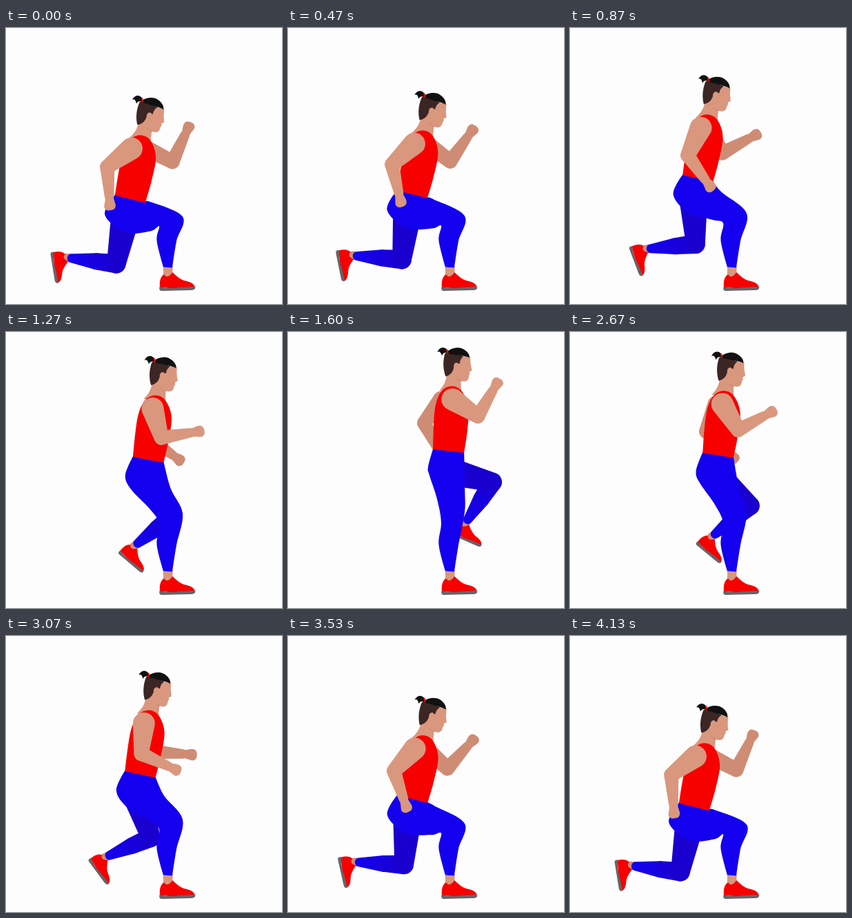
Animation of 400 by 400 pixels, one loop 4.2 s. Source, as an HTML page with a canvas:

```html
<!DOCTYPE html>
<html lang="en">
<head>
<meta charset="utf-8">
<title>Lunge to knee raise</title>
<style>
  html, body { margin: 0; width: 100%; height: 100%; overflow: hidden; background: #fefdfe; }
  canvas { display: block; width: 100vw; height: 100vh; }
</style>
</head>
<body>
<canvas id="stage"></canvas>
<script>
(() => {
  const LOOP = 4200;
  const FPS = 15;
  const RED = '#f60000', BLUE = '#1400ee', BLUE_FAR = '#1a00cf';
  const SKIN = '#d9977e', SKIN_FAR = '#cf8c75', BROWN = '#3b2624', BLACK = '#111111', SOLE = '#666468';

  // Each pose is met once rising and once sinking. Limb angles run from straight down, forward positive.
  const pose = (up, down, x, y, tilt, nearArm, farArm, leg) => ({ up, down, values: [x, y, tilt, ...nearArm, ...farArm, ...leg] });
  const poses = [
    pose(0, 4200, 180, 247, 9, [-53, 4], [63, 155], [-11, -97]),
    pose(630, 3530, 180.5, 235.5, 9, [-43, 19], [47, 138], [-4, -93]),
    pose(870, 3270, 185.5, 217, 8, [-25, 36], [30, 118], [3, -84]),
    pose(1270, 2850, 206.5, 184, 5.5, [17, 100], [-4, 54], [38, -52]),
    pose(1440, 2670, 214.5, 178, 4, [31, 118], [-19, 46], [48, -51]),
    pose(1720, 2370, 241.5, 169, 0, [68, 164], [-42, 19], [90, -22])
  ];
  const keys = [
    ...poses.map(p => ({ t: p.up, v: p.values })),
    ...poses.map(p => ({ t: p.down, v: p.values })).reverse()
  ];

  // Monotone cubic through the keys.
  function valueAt(t, k, n) {
    const rise = i => (keys[i + 1].v[n] - keys[i].v[n]) / (keys[i + 1].t - keys[i].t);
    const slope = i => {
      if (i === 0 || i === keys.length - 1) return 0;
      const a = rise(i - 1), b = rise(i);
      return a * b > 0 ? 2 * a * b / (a + b) : 0;
    };
    const span = keys[k + 1].t - keys[k].t;
    const u = (t - keys[k].t) / span, v = 1 - u;
    return v * v * (1 + 2 * u) * keys[k].v[n] + u * u * (3 - 2 * u) * keys[k + 1].v[n]
      + span * u * v * (v * slope(k) - u * slope(k + 1));
  }

  function poseAt(t) {
    let k = 0;
    while (k < keys.length - 2 && t >= keys[k + 1].t) k++;
    return keys[0].v.map((_, n) => valueAt(t, k, n));
  }

  const canvas = document.getElementById('stage');
  const ctx = canvas.getContext('2d');

  const rad = deg => deg * Math.PI / 180;
  const add = (p, x, y) => [p[0] + x, p[1] + y];
  const mix = (a, b, u) => [a[0] + (b[0] - a[0]) * u, a[1] + (b[1] - a[1]) * u];
  const reach = (p, len, deg) => add(p, len * Math.sin(rad(deg)), len * Math.cos(rad(deg)));
  const corner = p => [p[0], p[1], true];
  const turn = (x, y, deg) => {
    const c = Math.cos(rad(deg)), s = Math.sin(rad(deg));
    return [x * c - y * s, x * s + y * c];
  };

  // Closed smooth outline; points marked as corners stay sharp.
  function blob(pts, fill) {
    const n = pts.length;
    const tangent = i => {
      if (pts[i][2]) return [0, 0];
      const a = pts[(i + n - 1) % n], b = pts[(i + 1) % n];
      return [(b[0] - a[0]) / 6, (b[1] - a[1]) / 6];
    };
    ctx.beginPath();
    ctx.moveTo(pts[0][0], pts[0][1]);
    pts.forEach((p, i) => {
      const j = (i + 1) % n, q = pts[j], s = tangent(i), e = tangent(j);
      ctx.bezierCurveTo(p[0] + s[0], p[1] + s[1], q[0] - e[0], q[1] - e[1], q[0], q[1]);
    });
    ctx.fillStyle = fill;
    ctx.fill();
  }

  // Hull of two circles.
  function taper(a, ra, b, rb, fill) {
    const dir = Math.atan2(b[1] - a[1], b[0] - a[0]);
    const len = Math.hypot(b[0] - a[0], b[1] - a[1]);
    const off = Math.acos((ra - rb) / len);
    ctx.beginPath();
    ctx.arc(a[0], a[1], ra, dir + off, dir - off + 2 * Math.PI);
    ctx.arc(b[0], b[1], rb, dir - off, dir + off);
    ctx.closePath();
    ctx.fillStyle = fill;
    ctx.fill();
  }

  function shape(d, fill) {
    ctx.fillStyle = fill;
    ctx.fill(new Path2D(d));
  }

  function line(d, color, width) {
    ctx.strokeStyle = color;
    ctx.lineWidth = width;
    ctx.stroke(new Path2D(d));
  }

  function place([x, y], deg, scale, draw) {
    ctx.save();
    ctx.translate(x, y);
    ctx.rotate(rad(deg));
    ctx.scale(scale, scale);
    draw();
    ctx.restore();
  }

  function arm(shoulder, size, upperLen, upper, fore, fill) {
    const elbow = reach(shoulder, upperLen, upper);
    const wrist = reach(elbow, 43, fore);
    taper(shoulder, size, elbow, 10.5, fill);
    taper(elbow, 10.5, wrist, 6.8, fill);
    place(reach(wrist, 11, fore), 90 - fore, 1,
      () => shape('M-8-6L0-8C6-9 9-6 9-1C10 4 8 8 3 8.5L-8 6Z', fill));
  }

  // Origin at the heel, ankle at 13, -25.
  function shoe() {
    shape('M1-4C0-13 2-20 7-23C10-18 15-19 19-26C24-22 28-17 36-14C46-12 52-9 52-3L30-2Z', RED);
    shape('M.5-5C12-2 22-3 30-4C38-5 46-5 52-5C53-1 50 0 45 0L4 1C0 1 0-2 .5-5Z', SOLE);
  }

  function rearLeg(hip, thigh, shin) {
    const knee = reach(hip, 66, thigh);
    const calf = reach(knee, 29, shin);
    const cuff = reach(knee, 65, shin);
    const ankle = reach(knee, 72, shin);
    taper(cuff, 6.2, ankle, 6.2, SKIN_FAR);
    place(ankle, -5 - 0.9 * shin, 0.88, () => {
      ctx.translate(-13, 25);
      shoe();
    });
    const shade = ctx.createLinearGradient(...knee, ...cuff);
    shade.addColorStop(0, BLUE_FAR);
    shade.addColorStop(1, BLUE);
    taper(calf, 12, cuff, 6.5, shade);
    taper(knee, 13.8, calf, 12, shade);
    taper(hip, 20.5, knee, 13.8, BLUE_FAR);
  }

  function frontLeg(back, front, hip, knee) {
    const dir = Math.atan2(knee[1] - hip[1], knee[0] - hip[0]);
    // Point beside the thigh bone; a positive offset is the front.
    const beside = (u, off) => add(mix(hip, knee, u), off * Math.sin(dir), -off * Math.cos(dir));
    ctx.fillStyle = SKIN;
    ctx.fillRect(228, 344, 13.5, 18);
    place([222, 380], 0, 1, shoe);
    blob([
      corner(back), add(hip, -25, 0), beside(0.1, -25), beside(0.6, -20), add(knee, -18, 11),
      [218.5, 308], corner([228, 346.5]), corner([241, 347.5]), [247, 309],
      add(knee, 16, -3), beside(0.55, 22), corner(front)
    ], BLUE);
  }

  // Origin at the ear.
  function head() {
    shape('M-14 4L-14 15C-15 23-18 29-24 36L8 36L7 21C11 22 15 22 17 19C19 16 18 14 19 12' +
      'L20 10L19 8L23 5C22 1 20-4 20-14L-10-16Z', SKIN);
    shape('M-17-18C-20-6-19 5-15 15C-9 13-5 9-4 3L2-4L5-4C5-9 7-12 10-15L-12-21Z', BROWN);
    shape('M-3.8 0C-4-7 4-7 3.8-1C3.5 3 1 6-1 5.5C-3 5-3.8 3-3.8 0Z', SKIN);
    shape('M-15-20C-9-26 1-29 8-26C15-23 19-18 19-13C12-16 2-16-4-17C-9-18-12-17-15-20Z', BLACK);
    shape('M-13-23C-18-29-25-28-28-20C-24-22-23-19-21-15C-20-19-17-20-13-19Z', BLACK);
    line('M-14.5-24.5L-12.5-18.5', RED, 2);
    line('M-1 17C2 20 4 21 8 21.3', '#c27f69', 0.8);
  }

  // Origin at the middle of the waist.
  function upperBody() {
    place([8.5, -122], 0, 1, head);
    blob([
      corner([-22.5, -1]), [-22.5, -34], [-20.5, -64], [-12.5, -85], [1.5, -93],
      [16.5, -87], [27.5, -64], [26.5, -29], corner([22.5, 3])
    ], RED);
  }

  function figure([x, y, tilt, nearUpper, nearFore, farUpper, farFore, thigh, shin]) {
    const waist = [x, y];
    const onBody = (px, py) => add(waist, ...turn(px, py, tilt));
    const shoulder = onBody(5.5, -74);
    const hip = add(waist, -3.5 - 0.9 * tilt, 24);
    const knee = [240, 237 + 0.16 * y];

    // Shoulders slide along with the swing of the arms.
    arm(add(shoulder, farUpper / 4 - 9, 0), 12, 42, farUpper, farFore, SKIN_FAR);
    rearLeg(add(hip, 4, 6), thigh, shin);
    frontLeg(onBody(-22.5, -2), onBody(22.5, 2), hip, knee);
    place(waist, tilt, 1, upperBody);
    arm(add(shoulder, (nearUpper - 68) / 8, 0), 16, 44, nearUpper, nearFore, SKIN);
  }

  function render(now) {
    const ratio = window.devicePixelRatio || 1;
    const w = Math.round(innerWidth * ratio), h = Math.round(innerHeight * ratio);
    if (canvas.width !== w || canvas.height !== h) {
      canvas.width = w;
      canvas.height = h;
    }
    const scale = Math.min(w, h) / 400;
    ctx.setTransform(1, 0, 0, 1, 0, 0);
    ctx.clearRect(0, 0, w, h);
    ctx.setTransform(scale, 0, 0, scale, (w - 400 * scale) / 2, (h - 400 * scale) / 2);

    // Hold each step, with changes falling on tens of milliseconds.
    const step = Math.floor((now % LOOP + 5) * FPS / 1000) % (LOOP * FPS / 1000);
    figure(poseAt(step * 1000 / FPS));
  }

  const start = performance.now();
  function tick() {
    render(Math.max(0, performance.now() - start));
    requestAnimationFrame(tick);
  }
  tick();
})();
</script>
</body>
</html>
```
